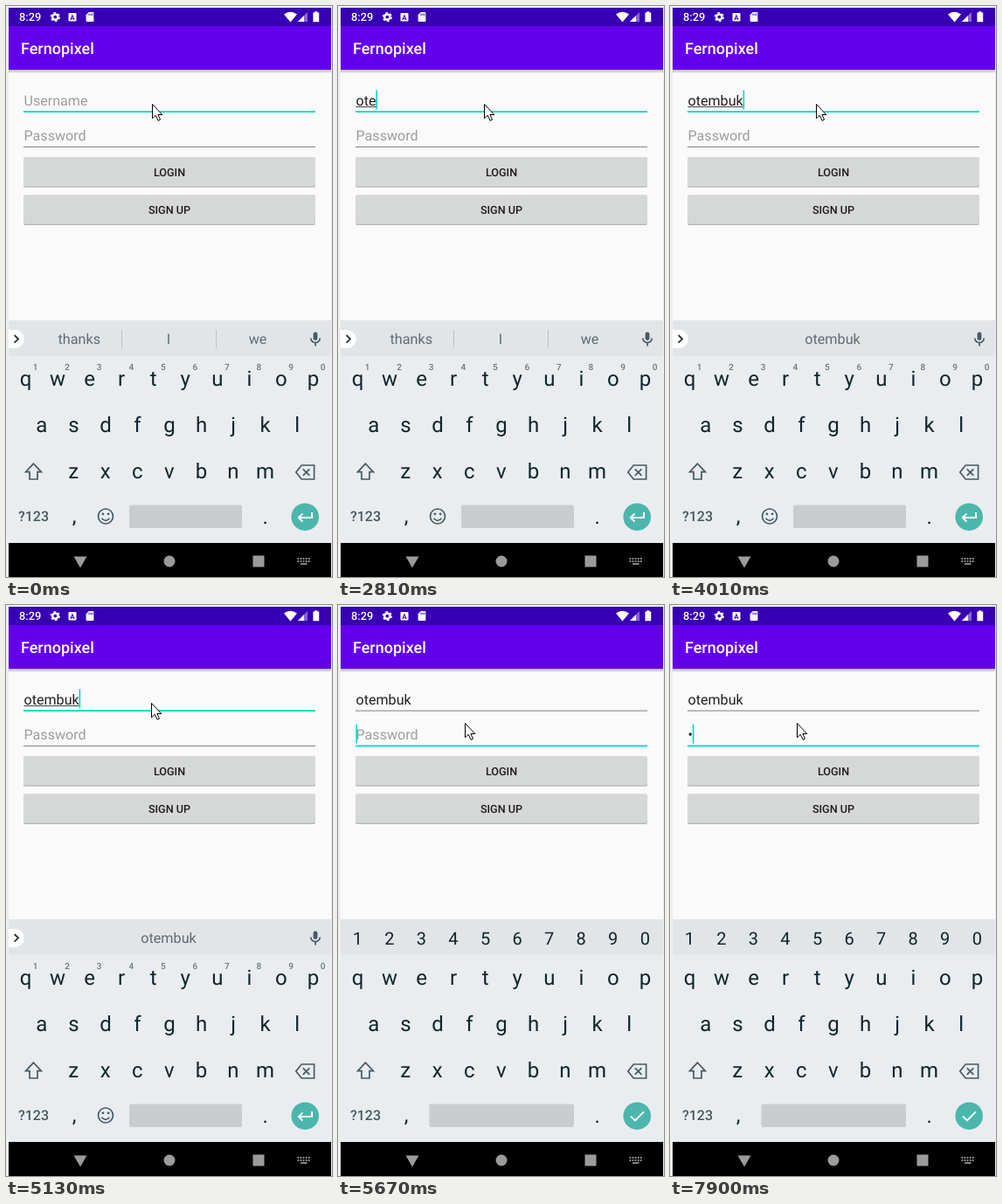
Recreate the animation shown at these times as an HTML page. Size 373 by 654 pixels, loop 8 s.

```html
<!DOCTYPE html>
<html lang="en">
<head>
<meta charset="utf-8">
<title>Login</title>
<style>
  html, body { margin: 0; width: 100%; height: 100%; overflow: hidden; background: #eeeef0; }
  svg { display: block; width: 373px; height: 654px; }
  text { font-family: Roboto, sans-serif; text-rendering: geometricPrecision; white-space: pre; }
  .mid { text-anchor: middle; }
  .med { font-weight: 500; }
  .field { font-size: 16.1px; }
  .key { font-size: 24px; fill: #10262d; }
  .num { font-size: 20px; fill: #10262d; }
  .sup { font-size: 10px; font-weight: 500; fill: #6a767c; }
  .word { font-size: 16.2px; fill: #5f6b72; }
  .best { font-weight: 700; fill: #000; }
  .btn { font-size: 12.6px; font-weight: 500; fill: #1c1c1c; }
  .line { fill: none; stroke: #455a64; stroke-width: 1.7; }
</style>
</head>
<body>
<svg viewBox="0 0 373 654">
  <defs>
    <linearGradient id="shade" x2="0" y2="1">
      <stop stop-color="#000" stop-opacity=".27"/>
      <stop offset="1" stop-color="#000" stop-opacity="0"/>
    </linearGradient>
  </defs>
  <rect x="3" y="2" width="369" height="652" fill="#fafafa"/>

  <!-- status bar -->
  <rect x="3" y="2" width="369" height="21" fill="#3700b3"/>
  <g fill="#fff">
    <text class="med" x="15" y="17.4" font-size="12.8">8:29</text>
    <circle cx="56.3" cy="12.6" r="3.1" fill="none" stroke="#fff" stroke-width="2.4"/>
    <circle cx="56.3" cy="12.6" r="4.8" fill="none" stroke="#fff" stroke-width="1.6" stroke-dasharray="2.5 2.53"/>
    <rect x="71.5" y="8" width="9" height="9.4" rx="1"/>
    <text class="mid" x="76" y="15.6" font-size="8" font-weight="700" fill="#3700b3">A</text>
    <path d="M94.8 7H99.4Q100.4 7 100.4 8V17Q100.4 18 99.4 18H92.6Q91.6 18 91.6 17V10.2Z"/>
    <path d="M95 8.6v2.4M97 8.6v2.4M98.9 8.6v2.4" stroke="#3700b3" stroke-width=".9"/>
    <path d="M318 9.6Q325.5 3.8 333 9.6L325.5 18.4Z"/>
    <path d="M345 7V18H334Z" opacity=".4"/>
    <path d="M341 11V18H334Z"/>
    <path d="M351.4 7.6H353.3V6.3H356.3V7.6H358.2V18.2H351.4Z"/>
  </g>

  <!-- app bar -->
  <rect x="3" y="23" width="369" height="50" fill="#6200ee"/>
  <rect x="3" y="73" width="369" height="4.5" fill="url(#shade)"/>
  <text class="med" x="17" y="55" font-size="18" fill="#fff">Fernopixel</text>

  <!-- form -->
  <g id="form"></g>
  <g id="buttons"></g>

  <!-- keyboard -->
  <rect x="3" y="360" width="369" height="255" fill="#e9edf0"/>
  <rect x="3" y="360" width="369" height="41" fill="#e1e5e8"/>
  <g id="keys"></g>
  <text class="mid med" x="31.5" y="590.3" font-size="16" fill="#455a64">?123</text>
  <path class="line" d="M31.5 524.2L22.6 533.7H27V542H36V533.7H40.4Z"/>
  <path class="line" d="M338.2 526H352.6V542H338.2L331.8 534ZM339.8 530.4L347.4 537.8M347.4 530.4L339.8 537.8"/>
  <circle cx="342.2" cy="585.2" r="15.8" fill="#4db6ac"/>

  <g id="wordMode">
    <g id="sups"></g>
    <path d="M3 371H10.5A10.4 10.4 0 0 1 10.5 391.8H3Z" fill="#fff"/>
    <path d="M9.6 377L14 381.3L9.6 385.6" fill="none" stroke="#263238" stroke-width="1.8"/>
    <rect x="351.6" y="373.4" width="4.8" height="9.6" rx="2.4" fill="#455a64"/>
    <path class="line" d="M348.8 380.4A5.2 5.2 0 0 0 359.2 380.4M354 386V389.4" stroke-width="1.5"/>
    <path id="bars" d="M132.5 371V392M240.5 371V392" stroke="#bcc2c6"/>
    <text class="mid word" x="83.8" y="387.3"></text>
    <text class="mid word" x="186" y="387.3"></text>
    <text class="mid word" x="288" y="387.3"></text>
    <circle class="line" cx="114" cy="584.5" r="8.5"/>
    <path class="line" d="M109.5 586.8Q114 591.8 118.5 586.8" stroke-width="1.5"/>
    <circle cx="110.9" cy="581.8" r="1.4" fill="#455a64"/>
    <circle cx="117.1" cy="581.8" r="1.4" fill="#455a64"/>
    <rect x="141" y="571.5" width="129" height="26.5" rx="2" fill="#c9cdd0"/>
    <path d="M350 580V586H335M339.4 581.4L334.8 586L339.4 590.6" fill="none" stroke="#fff" stroke-width="1.9"/>
  </g>
  <g id="digitMode">
    <g id="digits"></g>
    <rect x="104.5" y="571.5" width="165.5" height="26.5" rx="2" fill="#c9cdd0"/>
    <path d="M335 585.6L340 590.4L350 580.4" fill="none" stroke="#fff" stroke-width="1.9"/>
  </g>

  <!-- navigation bar -->
  <rect x="3" y="615" width="369" height="39"/>
  <g fill="#9b9b9b">
    <path d="M77.5 630.5H92.5L85 643.5Z"/>
    <circle cx="187" cy="636" r="6.5"/>
    <rect x="282.5" y="629.5" width="13" height="13"/>
    <path d="M333.5 633H348M333.5 636H348" stroke="#9b9b9b" stroke-width="1.8" stroke-dasharray="1.7 1.4"/>
    <rect x="337" y="638.2" width="7.5" height="1.7"/>
  </g>

  <path id="pointer" d="M0 0V16.3L3.8 12.8L6.6 18.8L9 17.7L6.4 12H11.3Z" fill="#fff" stroke="#000"/>
</svg>
<script>
const $ = id => document.getElementById(id);
const LEFT = 20.5, PITCH = 36.55;

function add(parent, tag, attrs, text = '') {
  const el = document.createElementNS('http://www.w3.org/2000/svg', tag);
  for (const name in attrs) el.setAttribute(name, attrs[name]);
  el.textContent = text;
  return parent.appendChild(el);
}
function row(id, chars, x, y, cls) {
  [...chars].forEach((c, i) => add($(id), 'text', { x: x + i * PITCH, y, class: 'mid ' + cls }, c));
}
function show(el, on) {
  el.setAttribute('visibility', on ? 'visible' : 'hidden');
}

row('keys', 'qwertyuiop', 22.5, 435.3, 'key');
row('keys', 'asdfghjkl', 40.8, 487.6, 'key');
row('keys', 'zxcvbnm', 77.2, 540.6, 'key');
row('keys', ',', 78, 592, 'key');
row('keys', '.', 296.6, 593, 'key');
row('sups', '1234567890', 33.6, 417.4, 'sup');
row('digits', '1234567890', 22.3, 389, 'num');

['LOGIN', 'SIGN UP'].forEach((label, i) => {
  const y = 173 + i * 43.2, box = { x: 20, width: 334, height: 33.5, rx: 2 };
  add($('buttons'), 'rect', { ...box, y: y + 1.2, fill: '#b4b4b4' });
  add($('buttons'), 'rect', { ...box, y, fill: '#d6d7d7' });
  add($('buttons'), 'text', { x: 187, y: y + 21.7, class: 'mid btn' }, label);
});

const fields = [['Username', 114], ['Password', 154.3]].map(([hint, y]) => ({
  hint, y,
  text: add($('form'), 'text', { x: LEFT, y, class: 'field' }),
  rule: add($('form'), 'rect', { x: 20, width: 334 }),
}));
const compose = add($('form'), 'rect', { x: LEFT, y: 115, height: 1, fill: '#444' });
const caret = add($('form'), 'rect', { width: 1.6, height: 22, fill: '#03dac5' });
const words = document.querySelectorAll('.word');

// Each step changes part of the state from its time onwards.
const steps = [
  [0, { values: ['', ''], focus: 0, caret: false, words: ['thanks', 'I', 'we'], mouse: [167.5, 112.5] }],
  [420, { caret: true }],
  [950, { caret: false }],
  [1510, { caret: true }],
  [1950, { caret: false }],
  [2530, { caret: true }],
  [2810, { values: ['ote', ''] }],
  [2940, { values: ['otem', ''], words: ['otem', 'Otem', 'Odem'], best: true }],
  [3470, { caret: false }],
  [3890, { values: ['otemb', ''], caret: true }],
  [4010, { values: ['otembuk', ''], words: ['', 'otembuk', ''], best: false }],
  [4570, { caret: false }],
  [5130, { caret: true, mouse: [166.5, 112.5] }],
  [5260, { mouse: [157.5, 126.5] }],
  [5400, { mouse: [145.5, 135.5] }],
  [5530, { focus: 1 }],
  [5670, { digits: true }],
  [6110, { caret: false }],
  [6380, { values: ['otembuk', 'a'], caret: true }],
  [6630, { values: ['otembuk', '•s'] }],
  [7060, { values: ['otembuk', '•••'] }],
  [7620, { caret: false }],
  [7770, { values: ['otembuk', '••'], caret: true }],
  [7900, { values: ['otembuk', '•'] }],
];

function render(time) {
  const s = {};
  for (const [start, change] of steps) if (start <= time) Object.assign(s, change);

  fields.forEach((f, i) => {
    const value = s.values[i], active = s.focus === i;
    f.text.textContent = value || f.hint;
    f.text.setAttribute('fill', value ? '#212121' : '#9c9c9c');
    f.rule.setAttribute('y', f.y + (active ? 6.2 : 6.6));
    f.rule.setAttribute('height', active ? 1.8 : 1);
    f.rule.setAttribute('fill', active ? '#03dac5' : '#7f7f7f');
  });

  const width = i => s.values[i] ? fields[i].text.getComputedTextLength() : 0;
  compose.setAttribute('width', s.digits ? 0 : width(0));
  caret.setAttribute('x', LEFT - .1 + width(s.focus));
  caret.setAttribute('y', s.focus ? 136.7 : 96.4);
  show(caret, s.caret);

  words.forEach((w, i) => w.textContent = s.words[i]);
  words[1].classList.toggle('best', !!s.best);
  show($('wordMode'), !s.digits);
  show($('digitMode'), s.digits);
  $('bars').setAttribute('opacity', s.words[0] ? 1 : 0);
  $('pointer').setAttribute('transform', `translate(${s.mouse})`);
}

const begin = performance.now();
function tick() {
  render((performance.now() - begin) % 8000);
  requestAnimationFrame(tick);
}
tick();
</script>
</body>
</html>
```
